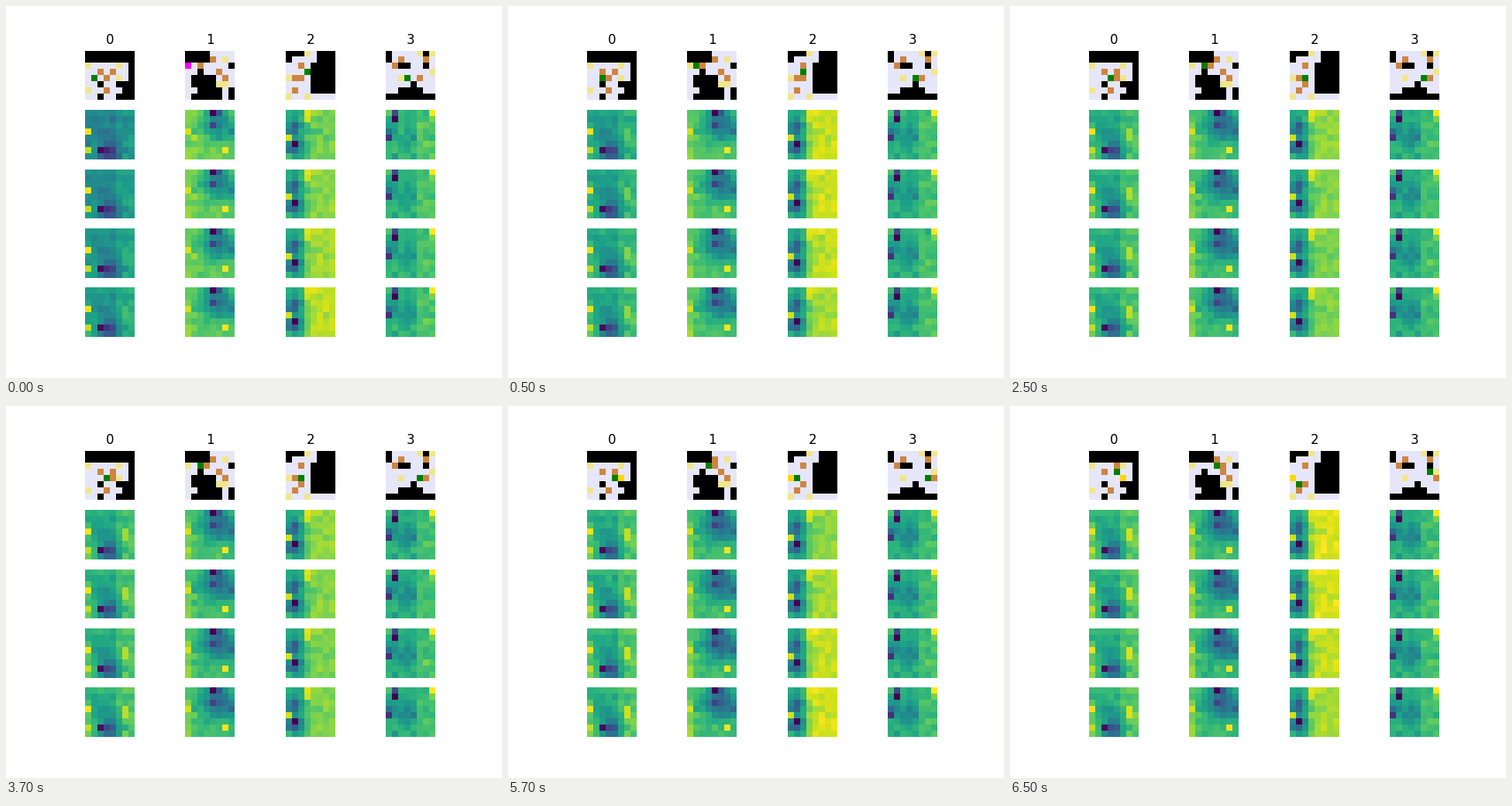
These frames come from a looping animation (640x480 px, 8 s). A matplotlib script:

```python
import matplotlib.pyplot as plt
import numpy as np
from matplotlib.animation import FuncAnimation
from matplotlib.colors import to_rgb

SIZE = 8
TICK_MS = 500
TICKS = 16
TICKS_PER_MOVE = 4
PLANS = 4                      # value maps shown for each move
STEPS = {"L": (0, -1), "R": (0, 1), "U": (-1, 0), "D": (1, 0)}
ROWS, COLUMNS = np.indices((SIZE, SIZE))

# Walls are (row, column, height, width); everything else is (row, column).
PUZZLES = [
    dict(walls=[(0, 0, 2, 8), (2, 7, 6, 1), (5, 2, 1, 1), (7, 2, 1, 1),
                (5, 5, 1, 2), (6, 6, 1, 1), (7, 5, 1, 2)],
         goals=[(2, 0), (2, 5), (4, 5), (6, 0)],
         boxes=[(3, 2), (3, 4), (4, 3), (6, 3)],
         start=(4, 1), moves="RRRU"),
    dict(walls=[(0, 0, 2, 4), (2, 7, 1, 1), (3, 2, 1, 1), (4, 1, 2, 4),
                (6, 2, 1, 4), (7, 1, 1, 5), (6, 7, 2, 1)],
         goals=[(1, 6), (2, 0), (5, 5), (5, 6)],
         boxes=[(1, 4), (2, 2), (3, 5), (4, 6)],
         start=(2, 0), moves="RRRR"),
    dict(walls=[(0, 0, 1, 3), (1, 0, 1, 1), (0, 5, 2, 3), (2, 4, 5, 4)],
         goals=[(0, 3), (4, 0), (7, 0), (7, 3)],
         boxes=[(2, 2), (4, 1), (4, 2), (6, 1)],
         start=(3, 3), moves="LDLD"),
    dict(walls=[(0, 0, 2, 1), (0, 6, 1, 1), (2, 2, 1, 2), (2, 6, 1, 1),
                (5, 4, 1, 1), (6, 2, 1, 4), (7, 0, 1, 8)],
         goals=[(0, 5), (0, 7), (3, 7), (4, 2)],
         boxes=[(1, 2), (1, 6), (2, 1), (4, 5)],
         start=(4, 3), moves="RRRU"),
]

# Sides are (early, late) levels that meet at the edge column. A pit is
# (row, column, early depth, late depth, spread); a spot is (row, column, level).
LANDSCAPES = [
    dict(left=(.48, .68), right=(.51, .74), edge=4.5, rim=.13, swing=0,
         pits=[(6.2, 3.5, .35, .45, 1), (3.5, 2.5, .07, .13, 1.5)],
         spots=[(3, 0, .97), (6, 0, .9), (6, 2, .03)],
         growing=[(3, 6), (4, 6)]),
    dict(left=(.80, .69), right=(.80, .71), edge=4, rim=.13, swing=0,
         pits=[(1.8, 4.8, .35, .38, 1.8), (3, 7, .15, .2, 1)],
         spots=[(0, 4, 0), (0, 5, .27), (2, 4, .2), (3, 0, .93), (6, 6, .98)],
         growing=[]),
    dict(left=(.62, .60), right=(.83, .87), edge=2.5, rim=0, swing=.07,
         pits=[(5.5, 1, .4, .4, .8), (2.5, 1, .35, .35, .8)],
         spots=[(0, 3, .96), (1, 3, .93), (4, 0, .93), (5, 1, 0)],
         growing=[]),
    dict(left=(.66, .64), right=(.74, .71), edge=4.5, rim=0, swing=0,
         pits=[(3.5, 2.8, .08, .2, 1.3), (3, 0, .25, .25, .8)],
         spots=[(0, 1, .22), (1, 1, 0), (4, 0, .14), (0, 7, .99), (1, 7, .8)],
         growing=[]),
]


def play(puzzle, move_count):
    """Return the player and box positions after the given number of moves."""
    player, boxes = puzzle["start"], set(puzzle["boxes"])
    for move in puzzle["moves"][:move_count]:
        dr, dc = STEPS[move]
        player = player[0] + dr, player[1] + dc
        if player in boxes:
            boxes.remove(player)
            boxes.add((player[0] + dr, player[1] + dc))
    return player, boxes


def board(puzzle, move_count):
    player, boxes = play(puzzle, move_count)
    goals = puzzle["goals"]
    image = np.full((SIZE, SIZE, 3), to_rgb("lavender"))
    for r, c, h, w in puzzle["walls"]:
        image[r:r + h, c:c + w] = to_rgb("black")
    for cell in goals:
        image[cell] = to_rgb("khaki")
    for cell in boxes:
        image[cell] = to_rgb("gold" if cell in goals else "peru")
    image[player] = to_rgb("magenta" if player in goals else "green")
    return image


def blend(early, late, progress):
    return early + (late - early) * progress


def value_map(column, plan):
    land = LANDSCAPES[column]
    progress = 1 - np.exp(-plan / 5)
    left = blend(*land["left"], progress)
    right = blend(*land["right"], progress)
    right += land["swing"] * np.sin(2 * np.pi * (plan - 1.6) / 11.5)

    values = blend(left, right, 1 / (1 + np.exp(3 * (land["edge"] - COLUMNS))))
    values[2:, 0] += land["rim"] * progress
    for r, c, early, late, spread in land["pits"]:
        distance = np.hypot(ROWS - r, COLUMNS - c) / spread
        values -= blend(early, late, progress) * np.exp(-distance ** 2 / 2)

    grain = np.random.default_rng(column).normal(0, .035, values.shape)
    flicker = np.random.default_rng((column, plan)).normal(0, .015, values.shape)
    values += grain + flicker
    for r, c, level in land["spots"]:
        values[r, c] = level
    for cell in land["growing"]:
        values[cell] = blend(.5, .95, progress)
    return np.clip(values, 0, 1)


fig, axes = plt.subplots(1 + PLANS, len(PUZZLES), figsize=(6.4, 4.8), dpi=100)
fig.subplots_adjust(left=.125, right=.9, bottom=.11, top=.88,
                    wspace=.2, hspace=.2)
images = []
for (row, column), ax in np.ndenumerate(axes):
    ax.axis("off")
    if row == 0:
        ax.set_title(str(column))
    images.append(ax.imshow(np.zeros((SIZE, SIZE)), cmap="viridis",
                            vmin=0, vmax=1))
images = np.array(images).reshape(axes.shape)


def update(tick):
    move_count = (tick + TICKS_PER_MOVE - 1) // TICKS_PER_MOVE
    for column, puzzle in enumerate(PUZZLES):
        images[0, column].set_data(board(puzzle, move_count))
        for row in range(PLANS):
            plan = PLANS * move_count + row
            images[row + 1, column].set_data(value_map(column, plan))
    return list(images.flat)


animation = FuncAnimation(fig, update, frames=TICKS, interval=TICK_MS,
                          init_func=lambda: update(0), repeat=True,
                          repeat_delay=0)
plt.show()
```
